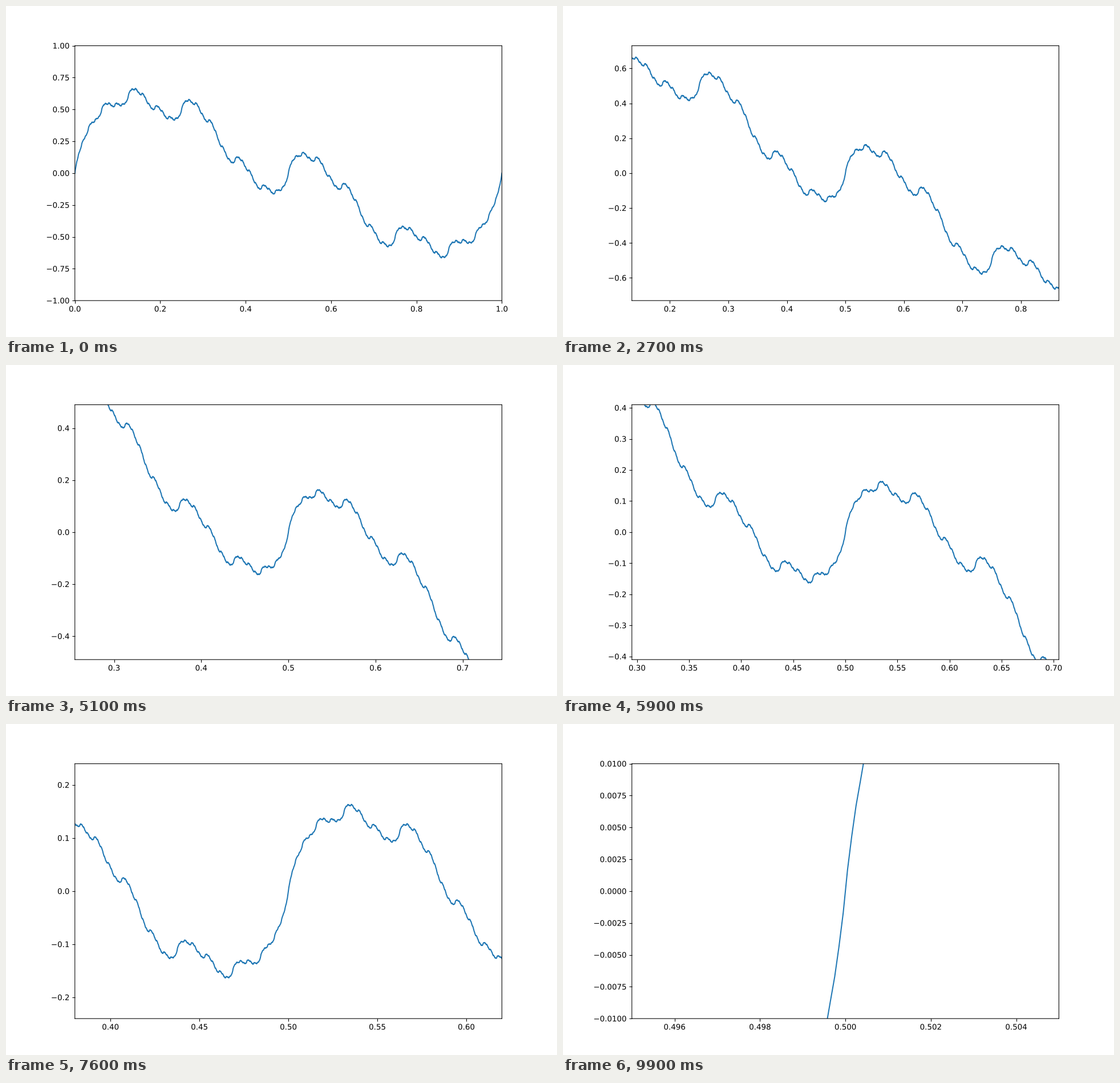
A matplotlib script that plays this animation: 966 px wide and 580 px high, repeating every 10 s.

```python
import matplotlib.pyplot as plt
import numpy as np
from matplotlib.animation import FuncAnimation
from matplotlib.patheffects import Normal

W, H, DPI = 966, 580, 96.6
FRAMES, INTERVAL = 100, 100
TERMS = 24

# Draw axes, ticks and labels as plain outlines at subpixel positions.
plt.rcParams.update({
    "path.snap": False,
    "path.effects": [Normal()],
    "text.hinting": "none",
})


def fractal(x):
    """Sum of sine octaves, each half as tall and twice as fast."""
    return sum(np.sin(2 * np.pi * 2**k * x) / 2 ** (k + 1) for k in range(TERMS))


# The small margin guards against rounding down a pixel.
fig, ax = plt.subplots(figsize=((W + 1e-6) / DPI, (H + 1e-6) / DPI), dpi=DPI)
x = np.linspace(0, 1, 10000)
line, = ax.plot(x, fractal(x))


def zoom(i):
    half = 1 - i / FRAMES
    ax.set_xlim(0.5 - half / 2, 0.5 + half / 2)
    ax.set_ylim(-half, half)
    return line,


anim = FuncAnimation(fig, zoom, frames=FRAMES, interval=INTERVAL,
                     init_func=lambda: zoom(0), repeat=True, repeat_delay=0)
plt.show()
```
